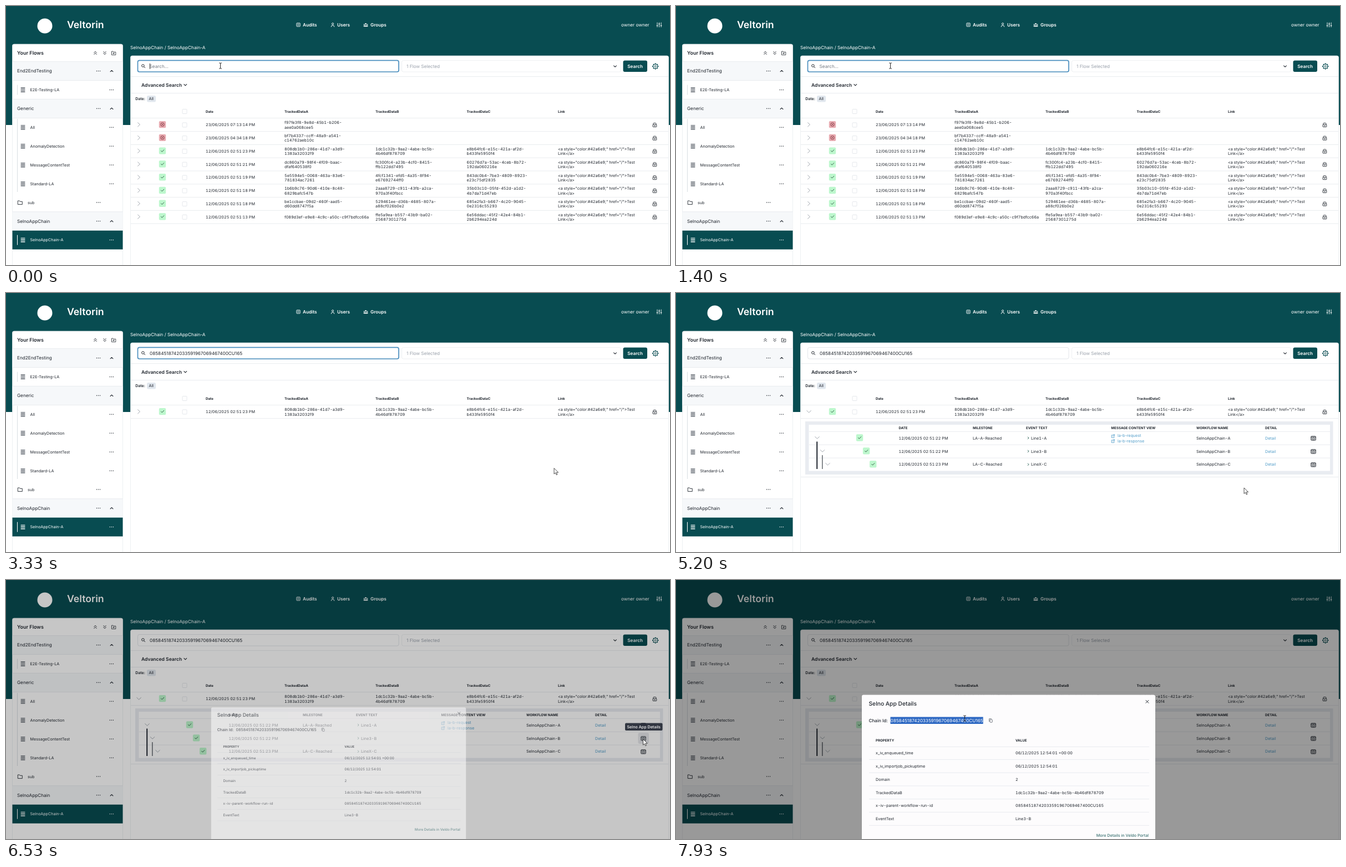
Animation, 1197 px wide and 468 px high, one loop 8000 ms. Source, as an HTML page:

```html
<!DOCTYPE html>
<html lang="en">
<head>
<meta charset="utf-8">
<title>Flow tracking</title>
<style>
  html, body { margin: 0; width: 100%; height: 100%; overflow: hidden; background: #fff; }
  svg { display: block; width: 1197px; height: 468px; }
  text { font-family: Inter, "Noto Sans", sans-serif; fill: #20262e; text-rendering: geometricPrecision; white-space: pre; }
  .num { font-variant-numeric: tabular-nums; }
  .w5 { font-weight: 500; } .w6 { font-weight: 600; } .w7 { font-weight: 700; }
  .white { fill: #fff; } .link { fill: #4f9bc8; } .ghost { fill: #9aa1ab; }
</style>
</head>
<body>
<svg id="stage" viewBox="0 0 1197 468"></svg>
<script>
const TEAL = '#084c51', INK = '#20262e', RULE = '#e9ecef';
const CHAIN = '08584518742033591967069467400CU165';
const LOOP = 8000;

// y is the middle of the capitals
const text = (x, y, s, size = 7.17, cls = '', more = '') =>
  `<text x="${x}" y="${(y + size * .364).toFixed(2)}" font-size="${size}" class="${cls}" ${more}>${
    s.replace(/&/g, '&amp;').replace(/</g, '&lt;')}</text>`;
const num = (x, y, s) => text(x, y, s, 7.17, 'num');
const head = (x, y, s) => text(x, y, s, 6.15, 'w7');
const rect = (x, y, w, h, fill, r = 0, more = '') =>
  `<rect x="${x}" y="${y}" width="${w}" height="${h}" rx="${r}" fill="${fill}" ${more}/>`;
const line = (d, stroke = INK, w = 1, more = '') =>
  `<path d="${d}" fill="none" stroke="${stroke}" stroke-width="${w}" stroke-linecap="round" stroke-linejoin="round" ${more}/>`;
const rule = (x1, x2, y) => rect(x1, y - .5, x2 - x1, 1, RULE);
const at = (x, y, s) => `<g transform="translate(${x} ${y})">${s}</g>`;
const group = (id, s) => `<g id="${id}">${s}</g>`;

const up = (x, y) => line(`M${x - 2.4} ${y + 1.2}l2.4-2.4 2.4 2.4`, INK, 1.1);
const down = (x, y) => line(`M${x - 2.4} ${y - 1.2}l2.4 2.4 2.4-2.4`, INK, 1.1);
const dots = (x, y, c = INK) => [-3, 0, 3].map(d => `<circle cx="${x + d}" cy="${y}" r=".75" fill="${c}"/>`).join('');
const closed = (x, y) => line(`M${x - 2} ${y - 3.6}l3.8 3.6-3.8 3.6`, '#8b929b', .8);
const opened = (x, y) => line(`M${x - 3.8} ${y - 1.8}l3.8 3.6 3.8-3.6`, '#8b929b', .8);
const box = (x, y) => rect(x - 4, y - 4, 8, 8, '#fff', 1, 'stroke="#dfe3e7" stroke-width=".8"');
const good = (x, y) => rect(x - 6.2, y - 6.2, 12.4, 12.4, '#bdf7cd', 2) + line(`M${x - 2.5} ${y}l1.8 1.8 3.4-3.6`, '#24553a', .9);
const bad = (x, y) => rect(x - 6.2, y - 6.2, 12.4, 12.4, '#e8abb1', 2) +
  `<circle cx="${x}" cy="${y}" r="3.3" fill="none" stroke="#7d2c38" stroke-width=".8"/>` +
  line(`M${x - 1.2} ${y - 1.2}l2.4 2.4m0-2.4l-2.4 2.4`, '#7d2c38', .8);
const stack = (x, y, c) => [-3.6, -1.2, 1.2, 3.6].map(d => rect(x - 4, y + d - .55, 8, 1.1, c, .4)).join('');
const bag = (x, y) => rect(x - 3.4, y - .8, 6.8, 4.2, 'none', .8, `stroke="${INK}" stroke-width=".9"`) +
  line(`M${x - 2.6} ${y - 1}v-1.3q0-1.3 1.3-1.3h2.6q1.3 0 1.3 1.3v1.3M${x - 1} ${y + 1.3}h2`, INK, .9);
const grid = (x, y) => rect(x - 4.2, y - 3.6, 8.4, 7.2, 'none', .8, `stroke="${INK}" stroke-width="1"`) +
  line(`M${x - 4} ${y - 2}h8M${x} ${y - 2}v5.4M${x - 2.8} ${y}h1.4m2.8 0h1.4M${x - 2.8} ${y + 1.8}h1.4m2.8 0h1.4`, INK, .8);
const folder = (x, y) => line(`M${x - 4} ${y + 3.2}v-6.2h3l1 1.3h4v4.9z`, INK, .9);
const person = (x, y, c = '#fff') => `<circle cx="${x}" cy="${y - 1.8}" r="1.6" fill="none" stroke="${c}" stroke-width=".9"/>` +
  line(`M${x - 2.8} ${y + 3.5}q0-2.7 2.8-2.7t2.8 2.7`, c, .9);

function topBar() {
  return rect(0, 0, 1197, 215, TEAL) +
    '<circle cx="70" cy="36" r="13.5" fill="#fff"/>' +
    text(110, 34, 'Veltorin', 17.7, 'w6 white') +
    rect(523.8, 30.8, 6.4, 6.2, 'none', .8, 'stroke="#fff" stroke-width=".9"') +
    line('M525.4 32.8h3.2M525.4 34.9h3.2', '#fff', .8) +
    text(535, 34, 'Audits', 8.2, 'w6 white') +
    person(589, 34) + text(597, 34, 'Users', 8.2, 'w6 white') +
    at(648.5, 34, '<circle cy="-1.6" r="1.3" fill="#fff"/><circle cx="-2.8" cy="-.4" r="1" fill="#fff"/><circle cx="2.8" cy="-.4" r="1" fill="#fff"/>' +
      rect(-4, 1.2, 8, 2, '#fff', .9)) +
    text(657, 34, 'Groups', 8.2, 'w6 white') +
    text(1109, 34, 'owner owner', 8.2, 'white') +
    line('M1174 30v8M1177.5 30v8M1181 30v8M1173 35.5h2M1176.5 32.5h2M1180 35.5h2', '#fff', .9);
}

function sidebar() {
  const section = (y, s) => rect(11.5, y - 17, 199, 34, '#f6f8fa') + rule(11.5, 210.5, y - 17) +
    text(20, y, s, 8.2) + dots(166.5, y) + up(190.5, y);
  const item = (y, s, on) => (on ? rect(11.5, y - 17, 199, 34, TEAL) : '') +
    rect(20, y - 9, 1, 18, on ? '#fff' : '#d8dde2') +
    stack(30.5, y, on ? '#fff' : '#3a424c') + text(43.5, y, s, 7.17, on ? 'white' : '') + dots(190.3, y, on ? '#fff' : INK);
  return rect(11.5, 69, 199, 420, '#fff', 3, `stroke="${RULE}" stroke-width=".8"`) +
    text(20, 84.8, 'Your Flows', 9, 'w6') +
    line('M158.8 84.4l2.2-2.2 2.2 2.2m-4.4 3l2.2-2.2 2.2 2.2M175.8 82.4l2.2 2.2 2.2-2.2m-4.4 3l2.2 2.2 2.2-2.2', INK, 1) +
    line('M190.4 88v-6h2.6l1 1.2h3.8v4.8zM194.1 84.4v2.4m-1.2-1.2h2.4', INK, .8) +
    section(117.5, 'End2EndTesting') + rule(11.5, 210.5, 134.5) + item(151.5, 'E2E-Testing-LA') +
    section(185.3, 'Generic') + rule(11.5, 210.5, 202.5) + rect(20, 204, 1, 132, '#d8dde2') +
    ['All', 'AnomalyDetection', 'MessageContentTest', 'Standard-LA'].map((s, i) => item(219.3 + 34 * i, s)).join('') +
    folder(25.3, 355) + text(39, 355, 'sub') + dots(166.5, 355) +
    section(388.8, 'SelnoAppChain') + item(422.8, 'SelnoAppChain-A', true);
}

function mainPanel() {
  let teeth = '';
  for (let i = 0; i < 8; i++) teeth += rect(-1, -5.6, 2, 2, TEAL, .5, `transform="rotate(${i * 45})"`);
  return text(224, 74.8, 'SelnoAppChain / SelnoAppChain-A', 8.2, 'white') +
    rect(224.5, 90, 970, 400, '#fff', 3, `stroke="${RULE}" stroke-width=".8"`) +
    rect(237.5, 98.5, 470.5, 20.5, '#fff', 3, 'stroke="#e3e6ea"') +
    rect(713.5, 98.5, 395, 20.5, '#fff', 3, 'stroke="#eef0f2"') +
    '<circle cx="246.9" cy="107.9" r="2.3" fill="none" stroke="#20262e"/>' + line('M248.7 109.7l2 2') +
    text(722, 109, '1 Flow Selected', 8.2, 'ghost') + down(1098, 109) +
    rect(1112.5, 98.5, 43.5, 20.5, TEAL, 3) + text(1120.3, 109, 'Search', 8.2, 'w6 white') +
    at(1170.7, 109, `<circle r="4.2" fill="none" stroke="${TEAL}"/><circle r="1.6" fill="none" stroke="${TEAL}" stroke-width=".9"/>` + teeth) +
    rule(225, 1194, 127.5) + text(244, 142.6, 'Advanced Search', 8.55, 'w6') + down(323.3, 142.6) +
    rule(225, 1194, 157.5) + text(233.3, 167.8, 'Date:', 6.9, 'w6') +
    rect(254, 162, 16, 11.5, '#e1e7ee', 2.5) + text(257.6, 167.8, 'All') +
    box(322, 190.5) + [[360, 'Date'], [502, 'TrackedDataA'], [666, 'TrackedDataB'], [830.5, 'TrackedDataC'], [995, 'Link']]
      .map(([x, s]) => head(x, 190.5, s)).join('') + rule(225, 1194, 202.5);
}

// date | A | B | C, with "/" where a cell wraps
const ROWS = [
  '23_06_2025 07:13:14|f97fe3f8-9e8d-45b1-b206-/aee0a068cee5',
  '23_06_2025 04:34:18|bf7b4337-ccff-48a9-a541-/c14762aeb10c',
  '12_06_2025 02:51:23|808db1b0-286e-41d7-a3d9-/1383a32032f9|1dc1c32b-9aa2-4abe-bc5b-/4b46df878709|e8b64fc6-e15c-421a-af2d-/b433fe5950f4',
  '12_06_2025 02:51:21|dc860a79-98f4-4f09-baac-/dfaf640538f0|fc300fc4-a23b-4cf0-8415-/ffb122dd7495|60276d7a-53ac-4ceb-8b72-/192da060216e',
  '12_06_2025 02:51:19|5e5594e5-0068-463a-83e6-/781834ac7261|4fcf1341-efd5-4a35-8f94-/e67692744ff0|843dc0b4-7be3-4809-8923-/e23c75df2835',
  '12_06_2025 02:51:18|1b6b9c76-90d6-410e-8c48-/6829bafc547b|2aaa8729-c911-43fb-a2ca-/970a3f40fbcc|35b03c10-05fd-452d-a1d2-/4b7da71d47eb',
  '12_06_2025 02:51:18|be1ccbae-09d2-460f-aad5-/d60dd8747f5a|529461ee-d36b-4685-807a-/a88cf026b0e2|685e2fa3-b667-4c20-9045-/0e2316c55293',
  '12_06_2025 02:51:13|f089d3ef-e9e8-4c9c-a50c-c9f7bdfcc66a|ffe5a9ea-b557-43b9-ba02-/25687301275d|6e56ddac-45f2-42e4-84b1-/2b6294ea224d'
];

function row(data, y) {
  const [date, ...cells] = data.split('|');
  const ok = cells.length > 1;
  const pair = (x, a, b) => num(x, y - 3.5, a) + num(x, y + 4.7, b);
  return (ok ? good : bad)(282, y - .2) + box(322, y + .6) +
    num(360, y + .3, date.replace(/_/g, '/') + ' PM') +
    cells.map((c, i) => {
      const x = [502, 666, 830.5][i], [a, b] = c.split('/');
      return b ? pair(x, a, b) : num(x, y + .3, a);
    }).join('') +
    (ok ? pair(995, '<a style="color:#42a6e9;" href="/">Test', 'Link</a>') : '') +
    bag(1169.4, y + .8) + rule(225, 1194, y + 12.4);
}

function nested() {
  const lines = [['22', 'LA-A-Reached', 'Line1-A', 'A'], ['22', '', 'Line3-B', 'B'], ['23', 'LA-C-Reached', 'LineX-C', 'C']];
  const out = (x, y) => line(`M${x} ${y - 1.5}h-2.6v4.6h4.6v-2.6M${x - .6} ${y + 1}l3.2-3.4m-2 0h2v2`, '#4f9bc8', .8);
  return rect(233, 232, 951.5, 96, '#e9ecf1') + rect(239.5, 238, 939.5, 83.5, '#fff') +
    [[401.5, 'DATE'], [535, 'MILESTONE'], [631, 'EVENT TEXT'], [784.5, 'MESSAGE CONTENT VIEW'], [938, 'WORKFLOW NAME'], [1062, 'DETAIL']]
      .map(([x, s]) => head(x, 244.2, s)).join('') + rule(240, 1179, 250.3) +
    lines.map(([sec, mile, event, id], i) => {
      const y = 262 + i * 23.9;
      return opened(254.5 + i * 9.5, y - .5) + good(331 + i * 12.1, y - .5) +
        num(401.5, y, `12/06/2025 02:51:${sec} PM`) + num(535, y, mile) +
        line(`M634.2 ${y - 1.8}l1.8 1.8-1.8 1.8`, '#2b6256', 1) + num(640, y, event) +
        num(938, y, 'SelnoAppChain-' + id) + text(1062, y, 'Detail', 7.17, 'link') + grid(1149, y + .5) +
        (i < 2 ? rule(240, 1179, y + 12.2) : '');
    }).join('') +
    out(787.8, 258.3) + text(796, 257.8, 'la-b-request', 7.17, 'link') +
    out(787.8, 267.3) + text(796, 266.9, 'la-b-response', 7.17, 'link') +
    rect(253.2, 268.5, 2, 49.5, INK) + rect(263.2, 293, 1.3, 25, '#4a5058') + rule(225, 1194, 332.5);
}

function dialog() {
  const props = [['x_iv_enqueued_time', '06/12/2025 12:54:01 +00:00'], ['x_iv_importjob_pickuptime', '06/12/2025 12:54:01'], ['Domain', '2'],
    ['TrackedDataB', '1dc1c32b-9aa2-4abe-bc5b-4b46df878709'], ['x-iv-parent-workflow-run-id', CHAIN], ['EventText', 'Line3-B']];
  return rect(335, 207.5, 529, 345, '#fdfcfd', 3) +
    text(347.5, 223.6, 'Selno App Details', 10.25, 'w5') + line('M847 217.3l5 5m0-5l-5 5', INK, 1) +
    text(347.5, 254, 'Chain Id:', 8.1, 'w5') + rect(386.5, 247.5, 171, 12.5, '#2c67c2', 0, 'id="mark"') +
    text(386.5, 254, CHAIN, 8.2, '', 'id="chain"') +
    rect(566, 252.2, 4.2, 5, 'none', .8, 'stroke="#555c66" stroke-width=".8"') + line('M564.6 255.6v-4.9h3.8', '#555c66', .8) +
    head(360, 289.5, 'PROPERTY') + head(612, 289.5, 'VALUE') + rule(348, 853, 301.3) +
    props.map(([k, v], i) => {
      const y = 312.5 + i * 23.8;
      return num(360, y, k) + num(612, y, v) + rule(348, 853, y + 11.9);
    }).join('') +
    text(852, 461, 'More Details in Veldo Portal', 7.17, 'w5', 'text-anchor="end" style="fill:#3c7373"');
}

const stage = document.getElementById('stage');
stage.innerHTML = topBar() + sidebar() + mainPanel() +
  group('focus', rect(237.5, 98.3, 470.5, 20.7, 'none', 3, 'stroke="#4b8fbf" stroke-width="1.7"')) +
  group('hint', text(258.6, 109, 'Search...', 8.2, '', 'style="fill:#727982"')) +
  group('query', text(259, 109, CHAIN, 8.2)) +
  rect(259, 103.8, .9, 10, '#111', 0, 'id="caret"') +
  group('all', ROWS.map((r, i) => row(r, 214.3 + i * 23.78) + closed(239.6, 214.3 + i * 23.78)).join('')) +
  group('hit', row(ROWS[2], 214.3)) + group('shut', closed(239.6, 214.3)) +
  group('open', opened(239.6, 214.3) + rect(1139.5, -10, 19.5, 20, '#8d97a5', 3, 'id="hover" opacity=".22"') + nested()) +
  group('mask', rect(0, 0, 1197, 468, '#000')) +
  group('tip', rect(1116, -6.7, 67.5, 13.4, '#252a36', 2) + text(1119.5, 0, 'Selno App Details', 7.17, 'w5 white')) +
  group('dialog', dialog()) +
  group('arrow', '<path d="M0 0v10.6l2.5-2.3 1.7 3.9 1.7-.7-1.7-3.8h3.4z" fill="#fff" stroke="#222" stroke-width=".8"/>') +
  group('beam', line('M-2-5h1.3q.7 0 .7.7v8.6q0 .7-.7.7H-2M2-5H.7Q0-5 0-4.3M2 5H.7Q0 5 0 4.3', '#111', .9));

const $ = id => document.getElementById(id);
const show = (id, on) => { $(id).style.display = on ? '' : 'none'; };
const clamp = v => Math.max(0, Math.min(1, v));

// pointer stops: time, x, y
const PATH = [[0, 386.5, 108], [2830, 386.5, 108], [2930, 406.5, 108], [3090, 406.5, 108], [3320, 988, 316.5], [3630, 988, 316.5],
  [3870, 296, 335], [4030, 296, 335], [4330, 240, 215], [4690, 240, 215], [4930, 291, 218], [5080, 291, 218], [5195, 1024, 352],
  [5480, 1024, 352], [5870, 1149, 263], [6030, 1149, 263], [6200, 1148.5, 287.5], [6670, 1148.5, 287.5], [6960, 515, 293],
  [7230, 515, 293], [7600, 520.5, 250], [LOOP, 520.5, 250]];

function pointer(t) {
  const i = PATH.findIndex(p => p[0] > t);
  const [t0, x0, y0] = PATH[i - 1], [t1, x1, y1] = PATH[i];
  const u = (t - t0) / (t1 - t0), k = u * u * (3 - 2 * u);
  return [x0 + (x1 - x0) * k, y0 + (y1 - y0) * k];
}

function draw(t) {
  const pasted = t >= 1730, found = t >= 2400, wide = t >= 4730;
  show('hint', !pasted);
  show('query', pasted);
  show('caret', t < 400 || (t >= 900 && t < 1400) || (pasted && t < 1930));
  $('caret').setAttribute('x', pasted ? 430.3 : 259);
  $('focus').setAttribute('opacity', 1 - clamp((t - 4730) / 200));
  show('all', !found);
  show('hit', found);
  show('shut', found && !wide);
  show('open', wide);

  const first = t >= 5830 && t < 6090, second = t >= 6150 && t < 6620;
  show('hover', first || second);
  $('hover').setAttribute('transform', `translate(0 ${first ? 262 : 286})`);
  $('hover').parentNode.appendChild($('hover'));
  $('tip').setAttribute('transform', `translate(0 ${first ? 241.5 : 265.3})`);
  $('tip').setAttribute('opacity', first ? clamp((t - 5870) / 80) : second ? clamp((t - 6200) / 80) * clamp((6614 - t) / 90) : 0);

  const p = 1 - (1 - clamp((t - 6495) / 150)) ** 3, s = .7 + .3 * p;
  $('mask').setAttribute('opacity', .4 * p);
  $('dialog').setAttribute('opacity', p);
  $('dialog').setAttribute('transform', `translate(599.5 380) scale(${s}) translate(-599.5 -380)`);
  const marked = t >= 7870;
  show('mark', marked);
  if (marked) $('mark').setAttribute('width', $('chain').getComputedTextLength());
  $('chain').style.fill = marked ? '#fff' : INK;

  const [x, y] = pointer(t);
  const typing = (y < 120 && x < 708) || t >= 7450;
  show('beam', typing);
  show('arrow', !typing);
  $(typing ? 'beam' : 'arrow').setAttribute('transform', `translate(${x} ${y})`);
}

const start = performance.now();
function tick(now) {
  draw(Math.max(0, now - start) % LOOP);
  requestAnimationFrame(tick);
}
draw(0);
requestAnimationFrame(tick);
</script>
</body>
</html>
```
